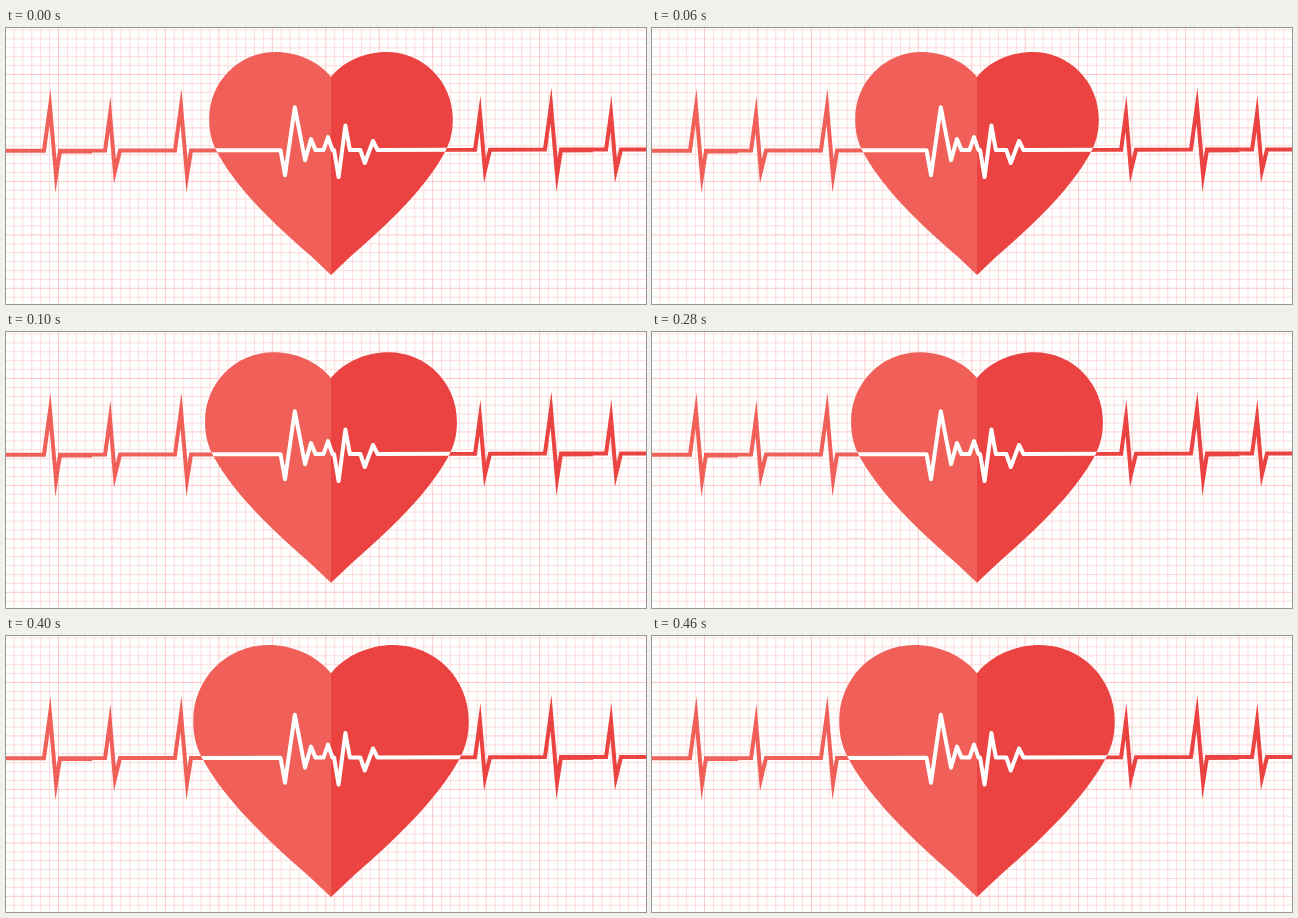
Write an HTML page with a canvas that moves like this. It is 640 px wide and 276 px high and loops after 0.5 s.

```html
<!DOCTYPE html>
<html lang="en">
<head>
<meta charset="utf-8">
<title>Heartbeat</title>
<style>
html, body { margin: 0; width: 100%; height: 100%; overflow: hidden; background: #fff; }
canvas { display: block; width: 640px; height: 276px; }
</style>
</head>
<body>
<canvas id="stage"></canvas>
<script>
const W = 640, H = 276, LOOP = 500, MID = 325;
const LIGHT = '#f06059', DARK = '#eb4341';
const canvas = document.getElementById('stage');
const ratio = window.devicePixelRatio || 1;
canvas.width = W * ratio;
canvas.height = H * ratio;
const ctx = canvas.getContext('2d');
ctx.scale(ratio, ratio);

// The whole trace tilts up slightly to the right
const base = x => 122.8 - x * 0.0022;

function line(points, color, width = 4, join = 'miter') {
  ctx.beginPath();
  for (const [x, y] of points) ctx.lineTo(x, y);
  ctx.strokeStyle = color;
  ctx.lineWidth = width;
  ctx.lineJoin = join;
  ctx.miterLimit = 24;
  ctx.stroke();
}

// Turns [x, height above the trace] pairs into stage points
const trace = pairs => pairs.map(([x, h]) => [x, base(x) - h]);

function grid(step, color, skip) {
  for (let i = -6; i * step < W; i++) {
    if (skip && i % skip === 0) continue;
    const x = 52.5 + i * step, y = 46.5 + i * step;
    line([[x, 0], [x, H]], color, 1);
    line([[0, y], [W, y]], color, 1);
  }
}

// Sharp beat: up, down below the trace, back
function spike(x, rise) {
  const dx = rise * 0.137;
  return [[x - dx, 0], [x, rise], [x + dx, -rise * 0.58], [x + 10, 0]];
}

function sideTrace(from, to, color, spikes, tall) {
  const beats = spikes.flatMap((x, i) => spike(x, i % 2 === tall ? 44 : 36));
  line(trace([[from, 0], ...beats, [to, 0]]), color);
  const x = spikes[tall] + 8;
  line(trace([[x, -0.8], [x + 34, -0.8]]), color);
}

// Each group of peaks leaves and rejoins the trace a few pixels away
const GROUPS = [
  [[279, -25], [288.8, 43], [299, -10], [305, 11]],
  [[322, 13]],
  [[332.6, -27], [339.4, 24.5]],
  [[358.8, -13], [367, 9]]
];

function pulse() {
  const foot = 4.5;
  const peaks = GROUPS.flatMap(g => [[g[0][0] - foot, 0], ...g, [g[g.length - 1][0] + foot, 0]]);
  line(trace([[180, 0], ...peaks, [470, 0]]), '#fff', 4, 'round');
}

// One half of the heart around its centre line
function halfHeart(scale, side) {
  const p = new Path2D();
  const at = (x, y) => [MID + side * x * scale, 135.4 + (y - 135.4) * scale];
  const curve = (a, b, c, d, e, f) => p.bezierCurveTo(...at(a, b), ...at(c, d), ...at(e, f));
  p.moveTo(...at(0, 49));
  curve(13, 33, 34, 24, 55.5, 24);
  curve(92.5, 24, 121.8, 54, 121.8, 91);
  curve(121.8, 102, 120, 112, 115, 122);
  curve(98.5, 154, 67.5, 187, 20, 228);
  p.lineTo(...at(0, 247));
  p.closePath();
  return p;
}

function draw(time) {
  const t = time % LOOP;
  const scale = t < 100 ? 1 : t < 400 ? 1.034 : 1.131;
  const lift = t < 400 ? 0 : -0.5;
  ctx.fillStyle = '#fff';
  ctx.fillRect(0, 0, W, H);
  grid(53.45 / 6, '#fddcdc', 6);
  grid(53.45, '#fbc9c9');

  ctx.save();
  ctx.translate(0, lift);
  sideTrace(-5, MID, LIGHT, [44, 104, 175], 0);
  sideTrace(MID, W + 5, DARK, [474, 545, 605], 1);

  const heart = new Path2D();
  for (const [side, color] of [[-1, LIGHT], [1, DARK]]) {
    const half = halfHeart(scale, side);
    ctx.fillStyle = color;
    ctx.fill(half);
    heart.addPath(half);
  }
  // The halves wind in opposite directions but do not overlap
  ctx.clip(heart);
  pulse();
  ctx.restore();
}

const start = performance.now();
function tick() {
  draw(performance.now() - start);
  requestAnimationFrame(tick);
}
tick();
</script>
</body>
</html>
```
